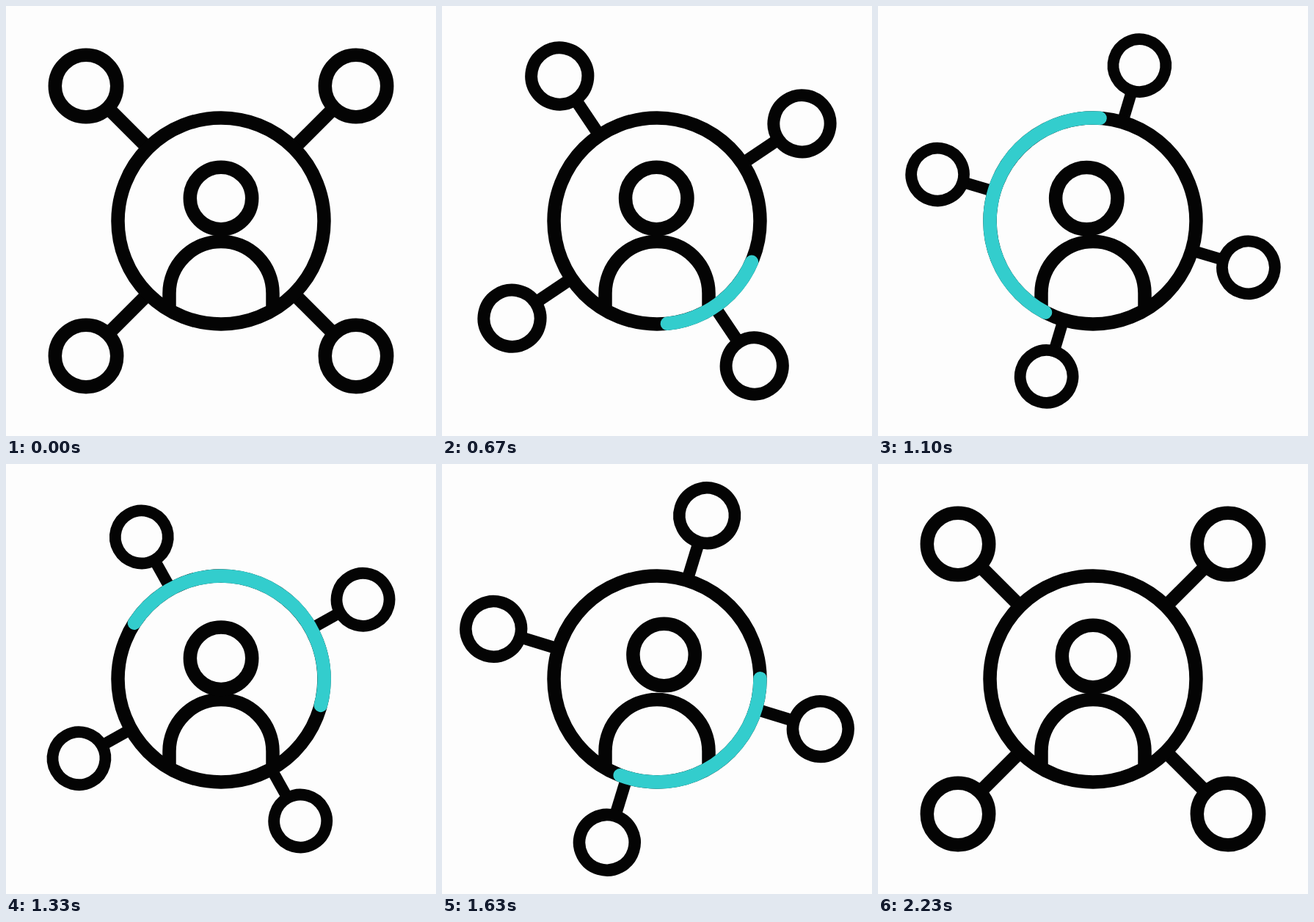
Write an HTML page that moves like this. It is 586 px wide and 586 px high and loops after 2.5 s.

```html
<!DOCTYPE html>
<html lang="en">
<head>
<meta charset="utf-8">
<title>Network</title>
<style>
  :root {
    --bg: #fdfdfd;
    --ink: #040404;
    --accent: #33cdcd;
  }
  html, body { margin: 0; width: 100%; height: 100%; overflow: hidden; background: var(--bg); }
  svg { display: block; width: 100vw; height: 100vh; }
  svg * { transform-origin: 0 0; }
  .line { fill: none; stroke: var(--ink); stroke-width: 18.5; }
  .ring { fill: var(--bg); }

  .satellites, .head, .arc { animation: 2500ms linear infinite; }
  .satellites {
    animation-name: turn, shrink;
    animation-timing-function: cubic-bezier(.535, 0, .465, 1);
  }
  .head { animation-name: sway; }
  .arc {
    stroke: var(--accent);
    stroke-linecap: round;
    animation-name: travel, stretch;
  }

  @keyframes turn {
    0%, 10.7% { rotate: 0deg; }
    89.3%, 100% { rotate: 180deg; }
  }
  @keyframes shrink {
    0%, 10.7% { scale: 1; }
    41%, 49% { scale: .85; }
    89.3%, 100% { scale: 1; }
  }
  @keyframes sway {
    0%, 24% { translate: 0 0; animation-timing-function: ease-in-out; }
    39.2% { translate: -10.5px -.5px; animation-timing-function: cubic-bezier(.4, 0, .7, .7); }
    52.8% { translate: -.3px 3px; animation-timing-function: cubic-bezier(.3, .3, .6, 1); }
    65.6% { translate: 9.6px -2px; animation-timing-function: ease-in-out; }
    76%, 100% { translate: 0 0; }
  }
  /* Position of the trailing end of the arc */
  @keyframes travel {
    0%, 17.2% { rotate: 15deg; }
    18.8% { rotate: 16.1deg; animation-timing-function: cubic-bezier(.333, .133, .667, .133); }
    34.8% { rotate: 48.2deg; animation-timing-function: cubic-bezier(.333, .195, .667, .592); }
    53.2% { rotate: 212.4deg; animation-timing-function: cubic-bezier(.333, .298, .667, .684); }
    65.2% { rotate: 359.2deg; animation-timing-function: cubic-bezier(.333, .345, .667, .743); }
    73.2% { rotate: 448.8deg; animation-timing-function: cubic-bezier(.333, .444, .667, .808); }
    80%, 100% { rotate: 493deg; }
  }
  /* Length of the arc in degrees */
  @keyframes stretch {
    0%, 17.19% { stroke-dasharray: 0 400; visibility: hidden; }
    17.2% { stroke-dasharray: 0 400; visibility: visible; }
    18.8% { stroke-dasharray: 5.5 400; animation-timing-function: cubic-bezier(.333, .175, .667, .772); }
    34.8% { stroke-dasharray: 120.3 400; animation-timing-function: cubic-bezier(.333, .72, .667, 1.243); }
    53.2% { stroke-dasharray: 162 400; animation-timing-function: cubic-bezier(.333, .131, .667, .442); }
    65.2% { stroke-dasharray: 111.6 400; animation-timing-function: cubic-bezier(.333, .262, .667, .727); }
    73.2% { stroke-dasharray: 40.2 400; animation-timing-function: cubic-bezier(.333, .412, .667, .859); }
    80% { stroke-dasharray: 0 400; visibility: visible; }
    80.01%, 100% { stroke-dasharray: 0 400; visibility: hidden; }
  }
</style>
</head>
<body>
<svg viewBox="0 0 586 586">
  <defs>
    <g id="satellite" class="line">
      <path d="M140 0H220"/>
      <circle cx="260.2" r="42.2"/>
    </g>
  </defs>
  <g transform="translate(293 293)">
    <g class="satellites">
      <use href="#satellite" transform="rotate(45)"/>
      <use href="#satellite" transform="rotate(135)"/>
      <use href="#satellite" transform="rotate(225)"/>
      <use href="#satellite" transform="rotate(315)"/>
    </g>
    <circle class="line ring" r="140.5"/>
    <path class="line" d="M-70.5 117V98.5A70.5 70.5 0 0 1 70.5 98.5V117"/>
    <circle class="line head" cy="-31" r="42.2"/>
    <circle class="line arc" r="140.5" pathLength="360"/>
  </g>
</svg>
</body>
</html>
```
